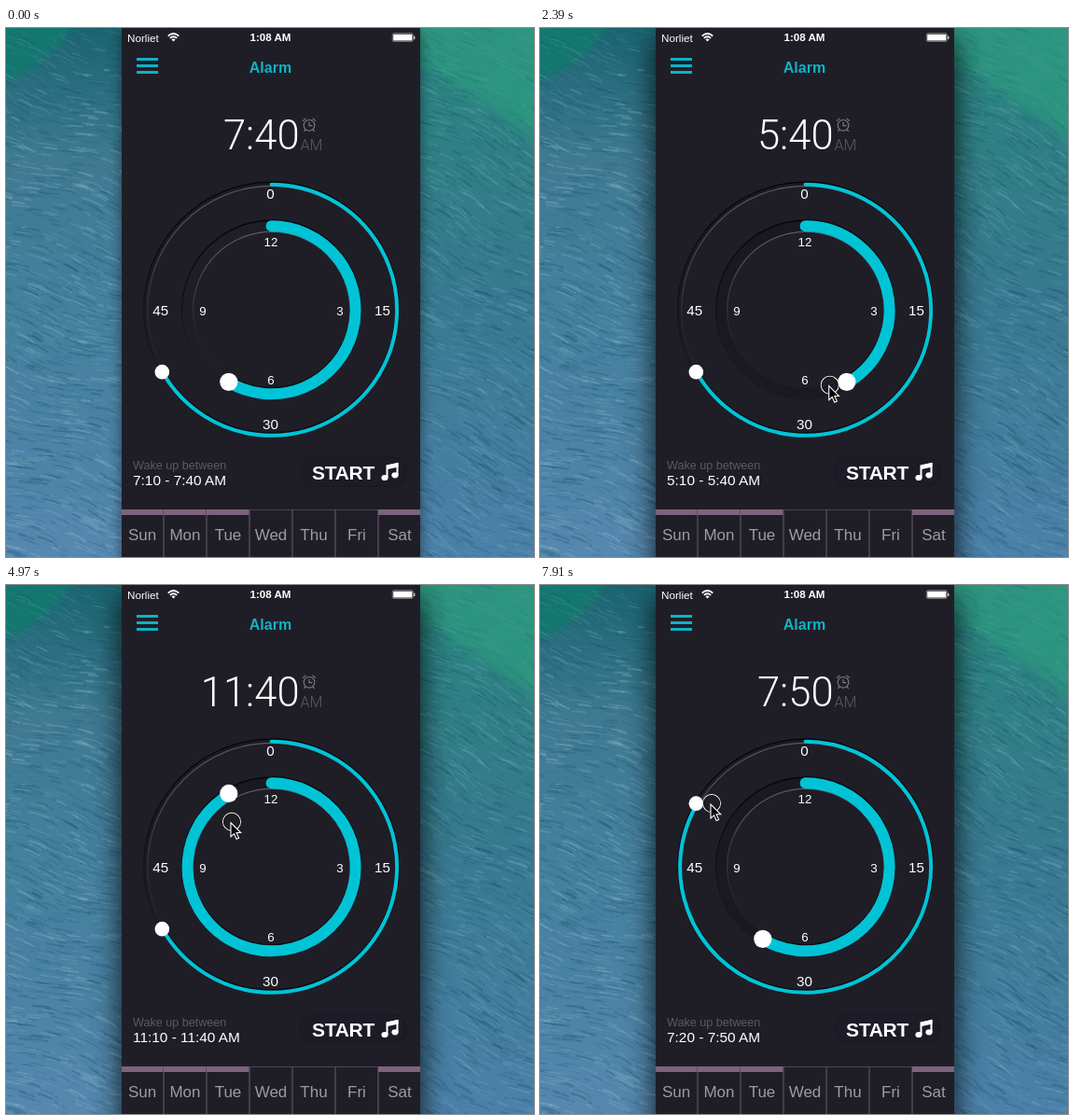
Write an HTML page with a canvas that moves like this. It is 566 px wide and 567 px high and loops after 8000 ms.

```html
<!DOCTYPE html>
<html lang="en">
<head>
<meta charset="utf-8">
<title>Alarm dial</title>
<style>
  html, body { margin: 0; width: 100%; height: 100%; overflow: hidden; background: #1f1e27; }
  canvas, svg { position: absolute; left: 0; top: 0; width: 566px; height: 567px; }
  text { font-family: "Liberation Sans", Arial, sans-serif; fill: #fff; }
  .light { font-family: Roboto, "Liberation Sans", sans-serif; font-weight: 350; }
  .bold { font-weight: 700; }
  .mid { text-anchor: middle; }
  .end { text-anchor: end; }
  .dim { fill: #5b5a63; }
  .line { fill: none; }
  .cyan { stroke: #00c4d6; stroke-linecap: round; fill: none; }
</style>
</head>
<body>
<canvas id="sea" width="566" height="567"></canvas>
<svg viewBox="0 0 566 567" xmlns="http://www.w3.org/2000/svg">
  <defs>
    <linearGradient id="shade" x2="0" y2="1">
      <stop offset="0" stop-color="#050509"/>
      <stop offset=".45" stop-color="#050509" stop-opacity=".5"/>
      <stop offset=".8" stop-color="#050509" stop-opacity="0"/>
    </linearGradient>
    <linearGradient id="gleam" x2=".25" y2="1">
      <stop offset="0" stop-color="#686772"/>
      <stop offset=".3" stop-color="#45444e"/>
      <stop offset=".55" stop-color="#2a2933"/>
      <stop offset=".9" stop-color="#2a2933" stop-opacity="0"/>
    </linearGradient>
    <filter id="near" x="-20%" width="140%"><feGaussianBlur stdDeviation="7"/></filter>
    <filter id="far" x="-20%" width="140%"><feGaussianBlur stdDeviation="16"/></filter>
  </defs>

  <rect id="idle" x="124" y="4" width="320" height="590" opacity=".5" filter="url(#near)"/>
  <rect id="focus" x="124" y="12" width="320" height="610" opacity=".85" filter="url(#far)"/>
  <rect x="124" width="320" height="567" fill="#1f1e27"/>

  <!-- status bar -->
  <text x="130" y="14.5" font-size="11.7">Norliet</text>
  <g class="line" stroke="#fff" stroke-width="1.7">
    <path d="M173.7 8.6Q179.5 3.4 185.3 8.6M175.8 10.9Q179.5 7.6 183.2 10.9"/>
    <path d="M177.4 12.2Q179.5 10.6 181.6 12.2L179.5 14.4Z" fill="#fff" stroke="none"/>
  </g>
  <text class="bold mid" x="283.5" y="14.3" font-size="11.6">1:08 AM</text>
  <rect x="414.3" y="5.7" width="22" height="8.8" rx="1.4" class="line" stroke="#aaa" stroke-width=".6"/>
  <rect x="415.2" y="6.7" width="20.2" height="6.8" rx=".6" fill="#fff"/>
  <rect x="437" y="8.6" width="1.4" height="3.4" rx=".6" fill="#ccc"/>

  <!-- header -->
  <path d="M140 33.5H163M140 40.5H163M140 47.5H163" stroke="#0bb3c5" stroke-width="3"/>
  <text class="bold mid" x="283.5" y="48" font-size="16" style="fill:#0fb4c6">Alarm</text>

  <!-- time -->
  <text id="time" class="light end" x="314.6" y="129.5" font-size="43.6"/>
  <text class="light dim" x="315.5" y="130.5" font-size="16">AM</text>
  <g class="line" stroke="#77767e" stroke-width="1.2" stroke-linecap="round">
    <circle cx="325" cy="104.3" r="5.8"/>
    <path d="M325 101V104.6H328M318.4 99.4L321 97.2M331.6 99.4L329 97.2M321 109L319.6 110.6M329 109L330.4 110.6"/>
  </g>

  <!-- dial -->
  <g class="line" transform="translate(284.6 302.3)">
    <circle r="134.5" stroke="#1c1b24" stroke-width="4"/>
    <circle r="137" stroke="url(#shade)" stroke-width="1.5"/>
    <circle r="132.9" stroke="url(#gleam)" stroke-width="1.2"/>
    <circle id="band" r="90" stroke="#191921" stroke-width="12"/>
    <circle r="96" stroke="url(#shade)" stroke-width="1.5"/>
    <circle r="84" stroke="url(#gleam)" stroke-width="1.2"/>
  </g>
  <path id="minShade" class="line" stroke="#07070b" stroke-width="4" opacity=".65" transform="translate(0 -1.6)"/>
  <path id="hourShade" class="line" stroke="#07070b" stroke-width="12" opacity=".65" transform="translate(0 -1.6)"/>
  <path id="minArc" class="cyan" stroke-width="4"/>
  <path id="hourArc" class="cyan" stroke-width="12"/>
  <g id="labels"/>
  <circle id="minKnob" r="7.8" fill="#fff"/>
  <circle id="hourKnob" r="9.6" fill="#fff"/>

  <!-- footer -->
  <text class="dim" x="136" y="473" font-size="12.6">Wake up between</text>
  <text id="wake" x="136" y="490" font-size="15.4"/>
  <rect x="315.5" y="460" width="114" height="31.5" rx="15.7" fill="#1c1b26" stroke="#181722"/>
  <text class="bold" x="328" y="483.5" font-size="21" letter-spacing="-.3">START</text>
  <path d="M408.5 482V469.5L419.5 467V479" class="line" stroke="#fff" stroke-width="2"/>
  <path d="M408 468.5L420.5 466V470.5L408 473.2Z" fill="#fff"/>
  <ellipse cx="406" cy="482" rx="3.6" ry="3.1" fill="#fff"/>
  <ellipse cx="417" cy="479.3" rx="3.6" ry="3.1" fill="#fff"/>
  <path d="M124 516.5H444" stroke="#4d4454"/>
  <g id="days"/>

  <g id="cursor">
    <g id="press" class="line">
      <circle r="9.4" stroke="#fff" stroke-width="1.1"/>
      <circle r="8.6" stroke="#000" stroke-width=".8"/>
    </g>
    <path d="M-1 1V16L2.5 12.8L5.1 18.5L7.6 17.4L5.1 11.8H9.7Z" fill="#000" stroke="#fff" stroke-width="1.1"/>
  </g>
</svg>

<script>
const LOOP = 8000, TICK = 88.8, CX = 284.6, CY = 302.3;
const $ = id => document.getElementById(id);

function add(parent, tag, attrs, text = "") {
  const el = document.createElementNS("http://www.w3.org/2000/svg", tag);
  for (const k in attrs) el.setAttribute(k, attrs[k]);
  el.textContent = text;
  parent.append(el);
}

function label(parent, x, y, size, text, fill = "#fff") {
  add(parent, "text", { class: "mid", x, y, "font-size": size, style: "fill:" + fill }, text);
}

let seed = 7;
const rnd = () => (seed = seed * 16807 % 2147483647) / 2147483647;

// Water: soft gradients, two wave tops and fine ripples
function paintSea() {
  const c = $("sea").getContext("2d");
  const strip = (x, colors) => {
    const g = c.createLinearGradient(0, 0, 0, 567);
    colors.forEach((col, i) => g.addColorStop(i / (colors.length - 1), col));
    c.fillStyle = g;
    c.fillRect(x, 0, 283, 567);
  };
  const shape = (color, blur, d) => {
    c.filter = `blur(${blur}px)`;
    c.fillStyle = color;
    c.fill(new Path2D(d));
    c.filter = "none";
  };
  strip(0, ["#1a6470", "#3f7a91", "#447f9d", "#4a82a4", "#5688b0"]);
  strip(283, ["#27877f", "#2f7f85", "#38798f", "#427d9d", "#4c80aa"]);
  shape("#14776f", 3, "M-9 -9H74Q50 40 -9 60Z");
  shape("#2d957f", 8, "M430 -20H590V135Q520 80 430 30Z");

  c.lineCap = "round";
  for (let i = 0; i < 2600; i++) {
    const right = i % 2, y = 567 * rnd();
    const x = rnd() * 150 - 20 + (right ? 441 : 0);
    const len = 5 + rnd() * 17;
    const slope = (right ? .5 : .32) + Math.sin(x / 30 + y / 45) * .22;
    const crest = y < (right ? 25 + (x - 440) * .85 : 70 - x * .3);
    c.globalAlpha = (crest ? .05 : .1) + rnd() * (crest ? .1 : .26);
    c.strokeStyle = rnd() < .52 ? "#1d566f" : right ? "#6fa9b8" : "#8dbaca";
    c.lineWidth = .8 + rnd() * 1.5;
    c.beginPath();
    c.moveTo(x, y);
    c.quadraticCurveTo(x + len / 2, y + len * slope * .25, x + len, y + len * slope);
    c.stroke();
  }
}
paintSea();

// Dial numbers and weekdays
[["12", 284, 234], ["3", 358, 308], ["6", 284, 382], ["9", 211, 308]]
  .forEach(([s, x, y]) => label($("labels"), x, y - .3, 13.3, s));
[["0", 283.5, 182.5], ["15", 403.5, 307.7], ["30", 283.5, 430], ["45", 165.7, 307.7]]
  .forEach(([s, x, y]) => label($("labels"), x, y, 15.2, s));
["Sun", "Mon", "Tue", "Wed", "Thu", "Fri", "Sat"].forEach((day, i) => {
  const x = 123 + 46 * i;
  if (i) add($("days"), "path", { d: `M${x} 516V567`, stroke: "#54465a", "stroke-width": 1.5 });
  if (i < 3 || i > 5)
    add($("days"), "rect", { x: Math.max(x, 124), y: 516, width: i ? 46 - (i > 5) : 45, height: 6, fill: "#7c637f" });
  label($("days"), x + 23, 549, 17, day, "#9d9ca3");
});

// Pointer path: time, x, y
const path = [
  [355, 354, 555], [620, 335, 400], [890, 266, 198], [1065, 267, 263], [1243, 232, 400],
  [1340, 232, 400], [1510, 238, 382], [1865, 238, 381], [2220, 272, 388], [2486, 330, 380],
  [2575, 330, 380], [2750, 262, 392], [2930, 205, 345], [3197, 197, 300], [3463, 218, 262],
  [3641, 231, 267], [4085, 250, 240], [4884, 250, 240], [5239, 218, 295], [5506, 229, 345],
  [5683, 249, 360], [5772, 248, 363], [5950, 240, 368], [6040, 240, 368], [6394, 200, 350],
  [6660, 160, 360], [6749, 167, 368], [6926, 167, 368], [7193, 161, 334], [7459, 163, 288],
  [7726, 178, 244], [7815, 178, 244], [7903, 184, 234]
];

function pointer(t) {
  const i = path.findIndex(p => p[0] >= t);
  if (i < 0) return path[path.length - 1].slice(1);
  if (!i) return path[0].slice(1);
  const [a, b] = [path[i - 1], path[i]], f = (t - a[0]) / (b[0] - a[0]);
  return [1, 2].map(k => a[k] + (b[k] - a[k]) * f);
}

// Clockwise turn from the top, 0 to 1
const turn = ([x, y]) => (Math.atan2(x - CX, CY - y) / (2 * Math.PI) + 1) % 1;
const spot = (r, f) => [CX + r * Math.sin(f * 2 * Math.PI), CY - r * Math.cos(f * 2 * Math.PI)];
const pad = n => String(n).padStart(2, "0");
const clock = m => Math.floor(m / 60) + ":" + pad(m % 60);
const show = (id, on) => $(id).style.visibility = on ? "visible" : "hidden";

function setDial(name, r, f) {
  const [x, y] = spot(r, f);
  const d = `M${CX} ${CY - r}A${r} ${r} 0 ${+(f > .5)} 1 ${x} ${y}`;
  $(name + "Arc").setAttribute("d", d);
  $(name + "Shade").setAttribute("d", d);
  $(name + "Knob").setAttribute("cx", x - .8);
  $(name + "Knob").setAttribute("cy", y - .9);
}

function draw(t) {
  t = Math.floor((t + 12) / TICK) * TICK;
  const at = pointer(t);
  const dragHour = t > 1600 && t < 5800, dragMin = t > 6960;
  const hour = dragHour ? Math.round(turn(at) * 12) : 7;
  const min = dragMin ? Math.floor(turn(at) * 60) : 40;
  const now = hour * 60 + min;

  setDial("hour", 90, hour / 12);
  setDial("min", 134.5, min / 60);
  $("time").textContent = clock(now);
  $("wake").textContent = `${clock(now - 30)} - ${clock(now)} AM`;
  $("cursor").setAttribute("transform", `translate(${at})`);
  show("cursor", t > 350);
  show("press", dragHour || dragMin);
  show("idle", t < 1600);
  show("focus", t >= 1600);
  show("band", t > 1850);
}

const start = performance.now();
(function tick() {
  draw((performance.now() - start) % LOOP);
  requestAnimationFrame(tick);
})();
</script>
</body>
</html>
```
